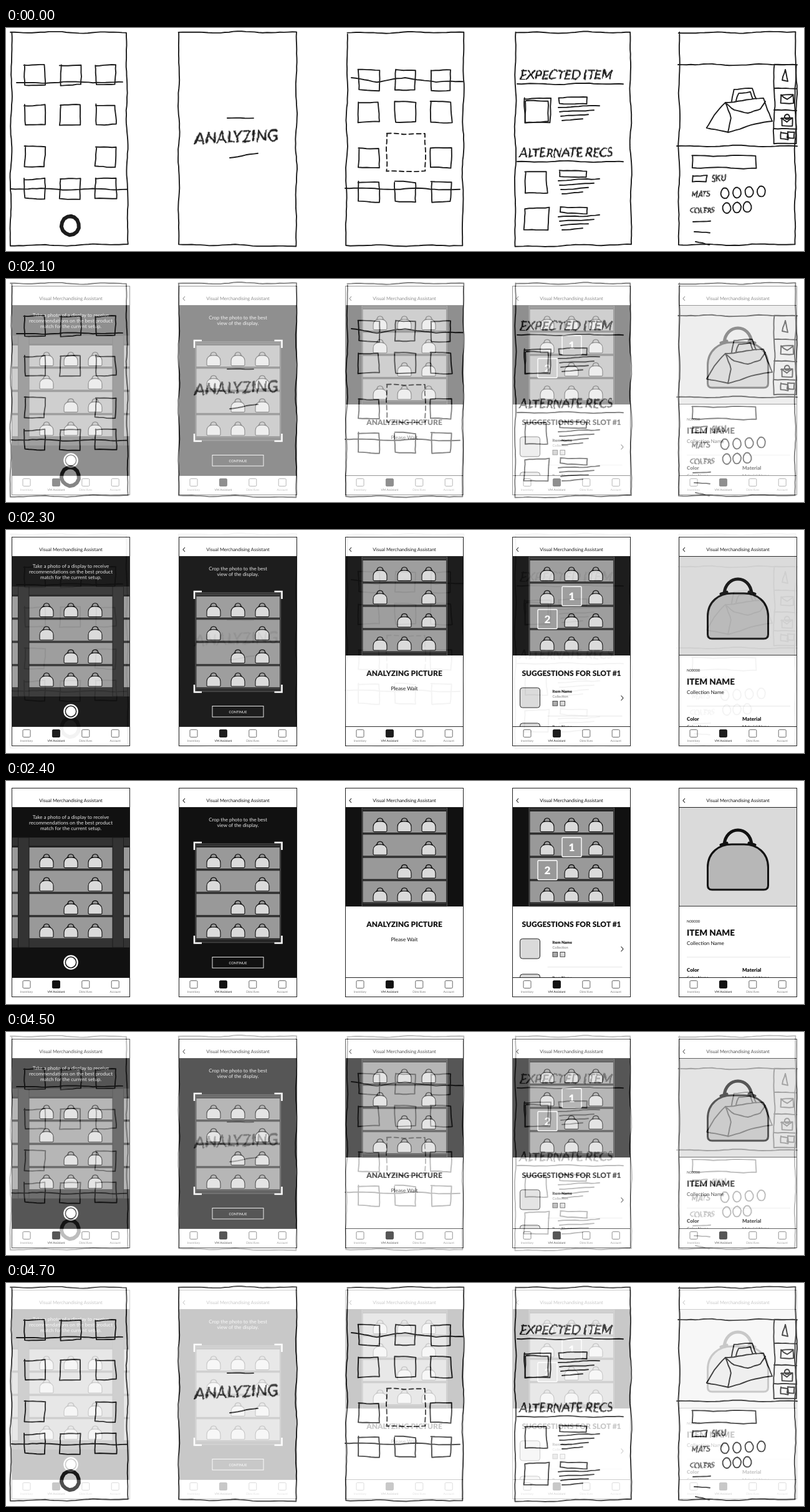
An HTML page for the animation above (4800 ms loop, 1280 by 359 pixels).

```html
<!DOCTYPE html>
<html lang="en">
<head>
<meta charset="utf-8">
<title>Sketch to wireframe</title>
<style>
  html, body { margin: 0; width: 100%; height: 100%; overflow: hidden; background: #fff; }
  svg { display: block; width: 1280px; height: 359px; }
  text { font-family: Lato, "Open Sans", sans-serif; text-rendering: geometricPrecision; }
  #sketch { fill: none; stroke: #1c1c1c; stroke-width: 1.9; stroke-linecap: round; stroke-linejoin: round; }
  #sketch text { fill: #1c1c1c; stroke-width: 0.5; font-style: italic; filter: url(#rough); }
</style>
</head>
<body>
<svg viewBox="0 0 1280 359" xmlns="http://www.w3.org/2000/svg">
  <filter id="rough" color-interpolation-filters="sRGB">
    <feTurbulence type="fractalNoise" baseFrequency="0.09" numOctaves="2" seed="4"/>
    <feDisplacementMap in="SourceGraphic" scale="5" xChannelSelector="R" yChannelSelector="G"/>
  </filter>
  <g id="sketch"></g>
  <g id="mock"></g>
</svg>
<script>
const INK = '#111', SHELF = '#999', PALE = '#dadada', FRAME = '#333';
const range = n => [...Array(n).keys()];
const repeat = (n, fn) => range(n).map(fn).join('');

const rect = (x, y, w, h, fill, more = '') =>
  `<rect x="${x}" y="${y}" width="${w}" height="${h}" fill="${fill}" ${more}/>`;
const text = (s, x, y, size, more = '') => `<text x="${x}" y="${y}" font-size="${size}" ${more}>${s}</text>`;

// ---------- hand-drawn layer ----------
let seed = 11;
const rand = () => (seed = (seed * 16807) % 2147483647) / 2147483647;
const jitter = a => (rand() - 0.5) * a;

// A shaky stroke: a slow sway across the line, growing with its length, plus a fine tremor
function pen(pts, attrs = '') {
  let d = `M${pts[0]}`;
  for (let i = 1; i < pts.length; i++) {
    const [ax, ay] = pts[i - 1], [bx, by] = pts[i];
    const len = Math.hypot(bx - ax, by - ay) || 1, n = Math.ceil(len / 7);
    const sway = Math.min(1.3, len / 60), turn = rand() * 6;
    for (const k of range(n)) {
      const p = (k + 1) / n;
      const off = sway * Math.sin(turn + p * len / 14) * Math.sin(Math.PI * p) + jitter(0.7);
      const x = ax + (bx - ax) * p - (by - ay) / len * off;
      const y = ay + (by - ay) * p + (bx - ax) / len * off;
      d += `L${x.toFixed(1)} ${y.toFixed(1)}`;
    }
  }
  return `<path d="${d}" ${attrs}/>`;
}
const line = (x, y, w, rise = 0, attrs) => pen([[x, y], [x + w, y - rise]], attrs);

function box(x, y, w, h, loose = 3, attrs) {
  const at = (px, py) => [px + jitter(loose), py + jitter(loose)];
  return pen([at(x, y), at(x + w, y), at(x + w, y + h), at(x, y + h), at(x, y)], attrs);
}
const loop = (cx, cy, rx, ry, attrs) =>
  pen(range(15).map(i => [cx + rx * Math.sin(i * 0.46), cy - ry * Math.cos(i * 0.46)]), attrs);
const loops = (n, x, y, gap) => repeat(n, i => loop(x + gap * i, y - i, 6.5, 8.5));
const letter = (s, x, y, size, tilt = 0) => text(s, x, y, size, `transform="rotate(${tilt} ${x} ${y})"`);

const page = x => box(x, 8, 186, 342, 4);

// Four shelves of boxes with an empty place in the third row
const shelfBoxes = (cx, gap, tops, size) => tops.map((y, row) =>
  repeat(3, c => row === 2 && c === 1 ? '' : box(cx + gap * c, y, size, size))).join('');

const shootSketch = shelfBoxes(30, 57, [60, 124, 191, 243], 32) +
  line(17, 88, 170, 1) + line(8, 259, 186, -1) + loop(103, 318, 14, 15, 'stroke-width="6"');

const waitSketch = line(355, 145, 42) + letter('ANALYZING', 303, 187, 26, -2.5) + line(359, 209, 45, 7);

const slotSketch = shelfBoxes(566, 58, [68, 119, 193, 248], 32) +
  pen([[554, 80], [595, 87], [640, 80], [690, 87], [733, 86]]) + line(544, 258, 184, -2) +
  box(611, 170, 61, 61, 2, 'stroke-dasharray="7 5"');

const scribbles = (n, x, y, w, gap) => repeat(n, i => line(x + 2 * i, y + gap * i, w - 11 * i, 3));
const entry = (y, size) => box(832, y, size, size - 2) + box(888, y - 2, 44, 10) + scribbles(4, 886, y + 14, 66, 7);
const heading = (s, y, size) => letter(s, 824, y, size, -0.3) + line(820, y + 7, 170, 0);

const listSketch = heading('EXPECTED ITEM', 83, 21) + heading('ALTERNATE RECS', 208, 20) +
  entry(114, 41) + box(834, 117, 36, 34) + entry(232, 36) + entry(290, 38);

const bagSketch =
  pen([[1154, 120], [1136, 140], [1124, 161], [1158, 168], [1163, 145], [1154, 120], [1215, 113], [1229, 150], [1195, 156], [1158, 168]]) +
  pen([[1156, 122], [1168, 132], [1190, 137], [1210, 130], [1218, 118]]) +
  pen([[1164, 118], [1168, 99], [1197, 97], [1203, 114]]) + pen([[1171, 117], [1175, 105], [1194, 103], [1198, 114]]);

const envelope = (x, y, w, h) => box(x, y, w, h, 2) + pen([[x, y], [x + w / 2, y + h / 2], [x + w, y]]);
const iconSketch = pen([[1250, 67], [1245, 84], [1254, 86], [1250, 67]]) + envelope(1243, 108, 20, 14) +
  envelope(1244, 145, 17, 13) + loop(1253, 143, 4, 4) + box(1244, 169, 11, 10) + box(1254, 167, 11, 10);

const detailSketch = line(1078, 59, 191) + line(1076, 190, 193) + bagSketch + iconSketch +
  box(1232, 59, 36, 127, 1) + line(1233, 97, 35, -1) + line(1232, 132, 36, -1) + line(1232, 162, 36, -1) +
  box(1101, 206, 102, 19, 2) + box(1102, 238, 22, 10, 2) + letter('SKU', 1132, 247, 13, -3) +
  letter('MATS', 1100, 272, 12, -2) + loops(4, 1153, 266, 19.5) +
  letter('COLERS', 1097, 298, 11.5, -2) + loops(3, 1156, 290, 16.5) +
  repeat(3, i => line(1102 + 2 * i, 312 + 16 * i, 28 - 3 * i, -3 * i + 1));

document.getElementById('sketch').innerHTML = [8, 278, 547, 817, 1080].map(page).join('') +
  shootSketch + waitSketch + slotSketch + listSketch + detailSketch;

// ---------- wireframe layer (x is relative to each screen) ----------
const MID = 94.5, BOLD = 'font-weight="900"';
const centred = (s, y, size, more = '', x = MID) => text(s, x, y, size, `text-anchor="middle" ${more}`);
const stroke = (d, color, w) => `<path d="${d}" fill="none" stroke="${color}" stroke-width="${w}"/>`;
const outlined = (color, w, r = 0) => `stroke="${color}" stroke-width="${w}" rx="${r}"`;

// Origin is the middle of the bag's bottom edge
const bag = (x, y, scale, w, fill, handle) => `
  <g transform="translate(${x} ${y}) scale(${scale})" stroke="${INK}">
    <path d="M-22 -72C-20 -104 20 -104 22 -72" fill="none" stroke-width="${handle}"/>
    <path d="M-48.5 -7V-36C-48.5 -60 -30 -73 -10 -73H10C30 -73 48.5 -60 48.5 -36V-7Q48.5 0 41.5 0H-41.5Q-48.5 0 -48.5 -7Z" fill="${fill}" stroke-width="${w}"/>
    <path d="M-27 -72L-18 -75M27 -72L18 -75" stroke-width="${w + 2}" stroke-linecap="round"/>
  </g>`;

const ROWS = [[0, 1, 2], [0, 2], [1, 2], [0, 1, 2]];
const shelfY = i => 107 + 37.4 * i;
const bags = () => ROWS.map((row, i) =>
  row.map(c => bag(55.5 + 39 * c, shelfY(i) + 32.6, 0.226, 5, PALE, 6)).join('')).join('');
const shelves = (x, w) => repeat(4, i =>
  rect(x, shelfY(i), w, 34, SHELF) + rect(x, shelfY(i) + 35.3, w, 1, '#444'));
const cabinet = () => rect(26.5, 101, 136.5, 159, '#222', outlined('#666', 0.8)) +
  rect(28, 103.5, 133.5, 1, '#555') + shelves(28, 133.5) + bags();

const corner = (x, y, sx, sy) => stroke(`M${x + 12 * sx} ${y}H${x}V${y + 12 * sy}`, '#fff', 2.5);
const slot = (n, x, y) => rect(x, y, 31, 31, SHELF, outlined('#fff', 1.4, 1.5)) +
  centred(n, y + 21.5, 17, `fill="#fff" ${BOLD}`, x + 15.5);
const dark = bottom => rect(0, 42, 189, bottom - 42, INK);
const note = (rows, y) => rows.map((s, i) => centred(s, y + 9 * i, 8, 'fill="#e4e4e4"')).join('');
const pillar = x => rect(x, 91, 17.5, 177, FRAME, outlined('#1c1c1c', 1));
const swatch = (x, fill) => rect(x, 275.5, 7.5, 7.5, fill, outlined('#333', 0.9));
const card = y => rect(12, y, 32, 32, PALE, outlined('#222', 1, 4)) +
  text('Item Name', 64, y + 8, 6.3, BOLD) + text('Collection', 64, y + 16, 5.7, 'fill="#777"');
const field = (name, x) => text(name, x, 307, 8, BOLD) + text(`${name} Name`, x, 318.5, 6.7);

const shoot = dark(316) +
  note(['Take a photo of a display to receive', 'recommendations on the best product', 'match for the current setup.'], 61) +
  rect(0, 91, 189, 177, FRAME) + rect(0, 104, 189, 152, '#222') + shelves(0, 189) +
  pillar(10) + pillar(161.5) + bags() +
  `<circle cx="${MID}" cy="292" r="11.8" fill="#fff"/><circle cx="${MID}" cy="292" r="8.7" fill="#fff" stroke="${INK}" stroke-width="1.5"/>`;

const crop = dark(316) + note(['Crop the photo to the best', 'view of the display.'], 65) + cabinet() +
  corner(24.5, 99, 1, 1) + corner(165, 99, -1, 1) + corner(24.5, 261, 1, -1) + corner(165, 261, -1, -1) +
  rect(53.5, 283.5, 82, 17.5, 'none', outlined('#fff', 0.9)) + centred('CONTINUE', 294.5, 5.6, 'fill="#fff"');

const display = dark(202) + `<g transform="translate(0 -58)">${cabinet()}</g>`;

const analyze = display + centred('ANALYZING PICTURE', 235, 12, BOLD) + centred('Please Wait', 257.5, 8.4);

const suggest = display + slot(1, 79.5, 91) + slot(2, 40.5, 128) +
  centred('SUGGESTIONS FOR SLOT #1', 235, 12, BOLD) + card(254) + swatch(64.5, '#aaa') + swatch(76.5, PALE) +
  stroke('M174 266.5L177.5 270.5L174 274.5', '#222', 1.1) + rect(56, 299, 120, 1, '#e6e6e6') + card(311);

const item = rect(0, 42, 189, 160, PALE) + rect(0, 201, 189, 1, '#333') + bag(MID, 175, 1, 3, '#b7b7b7', 5) +
  text('N00000', 12.5, 228, 5.8) + text('ITEM NAME', 12.5, 248.5, 13.5, BOLD) +
  text('Collection Name', 12.5, 264, 8.2) + rect(12.5, 283, 166, 1, '#e6e6e6') +
  field('Color', 12.5) + field('Material', 101.5);

const tabs = rect(0, 316, 189, 32, '#fff') + rect(0, 316, 189, 1, '#222') +
  ['Inventory', 'VM Assistant', 'Directives', 'Account'].map((name, i) => {
    const x = 23.5 + 47.4 * i, on = i === 1;
    return rect(x - 6, 321.5, 12, 12, on ? INK : '#fff', outlined(on ? INK : '#666', 1, 1.5)) +
      centred(name, 341.2, 4.8, `fill="${on ? INK : '#777'}"`, x);
  }).join('');

const screen = (body, i) => `
  <g transform="translate(${9.5 + Math.round(267.6 * i)} 0)" fill="${INK}">
    ${body}${tabs}
    ${centred('Visual Merchandising Assistant', 34.3, 7.5)}
    ${i ? stroke('M9.5 28L6.5 31.5L9.5 35', '#222', 1.1) : ''}
    ${rect(0, 42, 189, 1, '#222')}
    ${rect(0, 11.5, 189, 336, 'none', outlined('#222', 1))}
  </g>`;

const mock = document.getElementById('mock');
mock.innerHTML = rect(0, 0, 1280, 359, '#fff') + [shoot, crop, analyze, suggest, item].map(screen).join('');

// ---------- stepped cross-fade ----------
const LOOP = 4800, STEP = 100, FADE_IN = 2000, FADE_OUT = 4400;
const level = n => 0.24 * n - 0.01;
const fades = [
  [0, 0],
  ...range(4).map(i => [FADE_IN + STEP * i, level(i + 1)]),
  [FADE_IN + 4 * STEP, 1],
  ...range(4).map(i => [FADE_OUT + STEP * i, level(4 - i)]),
  [LOOP, level(1)]
];
mock.animate(
  fades.map(([t, opacity]) => ({ offset: t / LOOP, opacity, easing: 'steps(1, end)' })),
  { duration: LOOP, iterations: Infinity }
);
</script>
</body>
</html>
```
